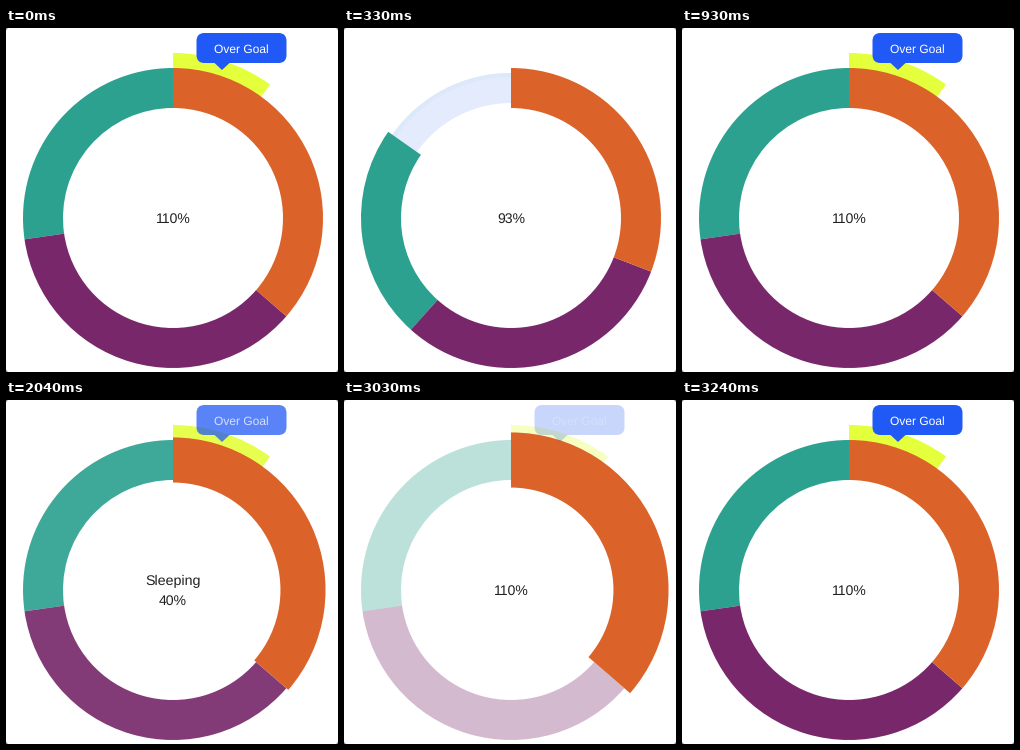
Write a matplotlib script that moves like this. It is 332x344 px and loops after 3.75 s.

```python
import matplotlib.pyplot as plt
from matplotlib.animation import FuncAnimation
from matplotlib.patches import FancyBboxPatch, Polygon, Wedge

W, H, DPI = 332, 344, 64
LOOP, STEP = 3750, 30
CENTER = (167, 190)
R_IN, R_OUT, POP = 110, 150, 10
TOTAL, FADED = 110, 0.22
ORANGE, PURPLE, TEAL = "#db6229", "#77276a", "#2ca18f"
YELLOW, BLUE, TRACK, RIM = "#e4ff3c", "#2059f5", "#e3ebfd", "#dbe9fa"

plt.rcParams["font.family"] = "Liberation Sans"
plt.rcParams["text.hinting"] = "none"

fig = plt.figure(figsize=(W / DPI, H / DPI), dpi=DPI, facecolor="#777777")
ax = fig.add_axes([0, 0, 1, 1])
ax.set_xlim(0, W)
ax.set_ylim(H, 0)
ax.axis("off")


def rounded(x, y, w, h, r, color, z):
    box = FancyBboxPatch((x, y), w, h, fc=color, lw=0, zorder=z,
                         boxstyle=f"round,pad=0,rounding_size={r}")
    return ax.add_patch(box)


def ring(color, inner, outer, z):
    return ax.add_patch(Wedge(CENTER, outer, -90, 270, width=outer - inner,
                              fc=color, lw=0, zorder=z))


def sweep(wedge, start, end):
    """Span the wedge clockwise, in degrees from the top."""
    wedge.set_visible(end - start > 0.01)
    wedge.set_theta1(start - 90)
    wedge.set_theta2(end - 90)


def label(x, y, px, color, text="", z=6):
    return ax.text(x, y, text, fontsize=px * 72 / DPI, color=color,
                   ha="center", va="baseline", zorder=z)


def phase(ms, start, length):
    return min(max((ms - start) / length, 0), 1)


def ease_out(t, power):
    return 1 - (1 - t) ** power


rounded(0, 0, W, H, 3, "white", 0)
track = ring(TRACK, 115, 145, 1)
rim = ring(RIM, 141, 145, 1)
over = ring(YELLOW, R_OUT - 2, 165, 2)
teal = ring(TEAL, R_IN, R_OUT, 3)
purple = ring(PURPLE, R_IN, R_OUT, 3)
orange = ring(ORANGE, R_IN, R_OUT, 4)
slices = [(orange, 40), (purple, 40), (teal, 30)]

tip = [
    rounded(190.5, 5, 90, 30, 8, BLUE, 5),
    ax.add_patch(Polygon([(208.5, 35), (223.5, 35), (216, 42)],
                         fc=BLUE, lw=0, zorder=5)),
    label(235.5, 24.6, 12, "white", "Over Goal"),
]
total_text = label(167, 195, 14, "#212121")
name_text = label(167, 185, 14.2, "#212121", "Sleeping")
share_text = label(167, 205, 14, "#212121", "40%")


def draw(i):
    ms = i * STEP
    grow = 1 if i == 0 else ease_out(phase(ms, 30, 800), 4)
    shown = 1 if i == 0 else ease_out(phase(ms, 540, 390), 2)
    enter, leave = phase(ms, 2010, 180), phase(ms, 3000, 240)
    pop = ease_out(enter, 1.6) - ease_out(leave, 2.1)
    fade = 1 - (1 - FADED) * (enter ** 1.2 - leave)

    value = TOTAL * grow
    angle = 0
    for wedge, share in slices:
        end = angle + 360 * grow * share / TOTAL
        sweep(wedge, angle, end)
        angle = end
    for wedge in (track, rim):
        sweep(wedge, angle, 360)
    sweep(over, 0, max(value - 100, 0) * 3.6)

    orange.set_radius(R_OUT + POP * pop)
    orange.set_width(R_OUT - R_IN + 2 * POP * pop)
    for wedge in (purple, teal, over):
        wedge.set_alpha(fade)
    for part in tip:
        part.set_alpha(shown * (1 - pop))

    hovered = 2040 <= ms < 3030
    name_text.set_visible(hovered)
    share_text.set_visible(hovered)
    total_text.set_visible(not hovered)
    total_text.set_text(f"{value:.0f}%")
    return []


anim = FuncAnimation(fig, draw, frames=LOOP // STEP, interval=STEP,
                     repeat=True, repeat_delay=0, blit=False)
plt.show()
```
